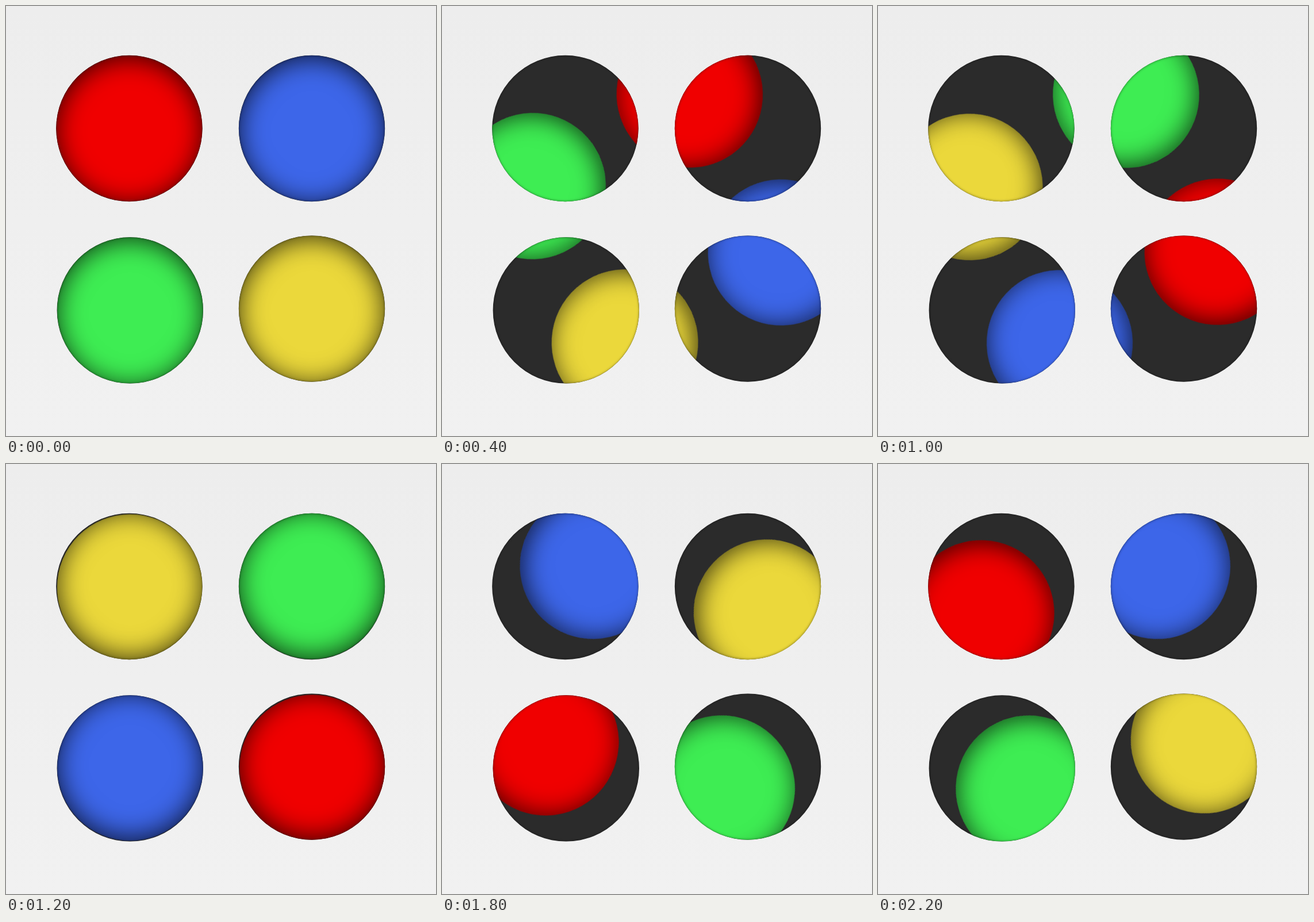
Recreate the animation shown at these times as an HTML page. Size 748 by 748 pixels, loop 2.3 s.

```html
<!DOCTYPE html>
<html lang="en">
<head>
<meta charset="utf-8">
<title>Rotating balls behind four holes</title>
<style>
  html, body {
    margin: 0;
    width: 100%;
    height: 100%;
    overflow: hidden;
  }
  body {
    position: relative;
    background: linear-gradient(#ededed, #f1f1f1);
  }
  .window, .balls, .rims {
    position: absolute;
    left: 0;
    top: 0;
    width: 748px;
    height: 748px;
  }
  .window {
    background: #2b2b2b;
    clip-path: url(#holes);
  }
  .balls {
    transform-origin: 374px 370.7px;
    animation: turn 2300ms infinite;
  }
  i {
    --r: 127.2px;
    position: absolute;
    left: calc(var(--x) - var(--r));
    top: calc(var(--y) - var(--r));
    width: calc(2 * var(--r));
    height: calc(2 * var(--r));
    border-radius: 50%;
  }
  .balls i {
    background: var(--c);
    box-shadow: inset 0 5px 45px rgba(0, 0, 0, .75);
  }
  .rims i { box-shadow: inset 0 0 4px rgba(0, 0, 0, .45); }

  .tl { --x: 214.4px; --y: 213px;   --c: #f00000; }
  .tr { --x: 532px;   --y: 213px;   --c: #3d66e9; }
  .bl { --x: 215.8px; --y: 529.4px; --c: #3eed53; }
  .br { --x: 532px;   --y: 526.6px; --c: #ebd83b; }

  /* 15 degrees every 100 ms, with one double step at 1700 ms */
  @keyframes turn {
    0% { transform: rotate(0deg); animation-timing-function: steps(17, end); }
    73.913% { transform: rotate(255deg); animation-timing-function: step-end; }
    73.9131% { transform: rotate(270deg); animation-timing-function: steps(6, end); }
    100% { transform: rotate(360deg); }
  }
</style>
</head>
<body>
<svg width="0" height="0" style="position:absolute">
  <clipPath id="holes" clipPathUnits="userSpaceOnUse">
    <circle cx="214.4" cy="213" r="127.2"/>
    <circle cx="532" cy="213" r="127.2"/>
    <circle cx="215.8" cy="529.4" r="127.2"/>
    <circle cx="532" cy="526.6" r="127.2"/>
  </clipPath>
</svg>
<div class="window">
  <div class="balls"><i class="tl"></i><i class="tr"></i><i class="bl"></i><i class="br"></i></div>
  <div class="rims"><i class="tl"></i><i class="tr"></i><i class="bl"></i><i class="br"></i></div>
</div>
</body>
</html>
```
